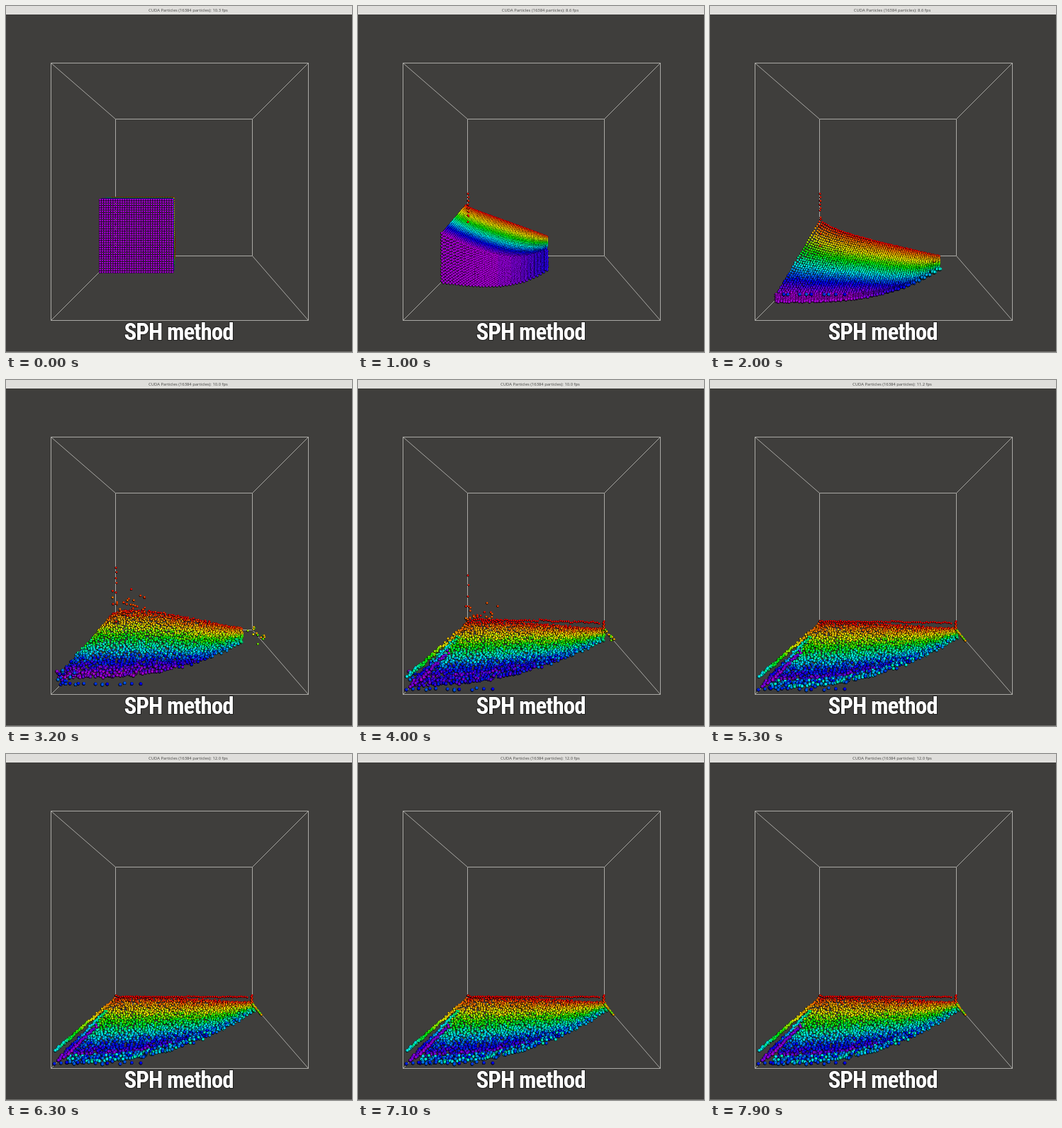
These frames come from a looping animation (488 by 488 pixels, 8000 ms). An HTML page with a canvas:

```html
<!DOCTYPE html>
<html lang="en">
<head>
<meta charset="utf-8">
<title>SPH method</title>
<style>
html, body { margin: 0; width: 100%; height: 100%; overflow: hidden; background: #3f3e3c; }
canvas { display: block; width: 488px; height: 488px; }
</style>
</head>
<body>
<canvas id="stage" width="488" height="488"></canvas>
<script>
const ctx = document.getElementById('stage').getContext('2d');
const LOOP = 8000, STEP = 100;

const clamp = (x, a = 0, b = 1) => Math.min(b, Math.max(a, x));
const mix = (a, b, k) => a + (b - a) * k;
const mixPt = (p, q, k) => [mix(p[0], q[0], k), mix(p[1], q[1], k)];
const ramp = (t, a, b) => clamp((t - a) / (b - a));
const many = (n, make) => Array.from({ length: n }, (_, i) => make(i));

let seed = 7;
function rnd() {
  seed = (seed * 16807) % 2147483647;
  return seed / 2147483647;
}
const spread = () => rnd() + rnd() - 1;

// Rainbow from the back of the block (0) to its front (1)
const HUES = 48;

function rainbow(c) {
  if (c < 1 / 3) return [255, 765 * c, 0];
  if (c < 1 / 2) return [255 * (3 - 6 * c), 255, 0];
  if (c < 2 / 3) return [0, 255, 255 * (6 * c - 3)];
  if (c < 5 / 6) return [0, 255 * (5 - 6 * c), 255];
  return [180 * (6 * c - 5), 0, 255 - 25 * (6 * c - 5)];
}

function makeBall(c) {
  const rgb = rainbow(c);
  const shade = k => `rgb(${rgb.map(v => Math.round(v * k)).join()})`;
  const cv = document.createElement('canvas');
  cv.width = cv.height = 16;
  const g = cv.getContext('2d');
  const fill = g.createRadialGradient(9.8, 5.6, 0.5, 8.8, 7, 9);
  fill.addColorStop(0, shade(1));
  fill.addColorStop(0.35, shade(0.9));
  fill.addColorStop(0.65, shade(0.48));
  fill.addColorStop(0.9, shade(0.03));
  g.fillStyle = fill;
  g.beginPath();
  g.arc(8, 8, 7.7, 0, 7);
  g.fill();
  return cv;
}
const balls = many(HUES + 1, i => makeBall(i / HUES));

function ball(x, y, r, c) {
  ctx.drawImage(balls[Math.round(clamp(c) * HUES)], x - r, y - r, 2 * r, 2 * r);
}
const sizeAt = y => 1.8 + clamp((y - 340) / 100) * 1.1;

// Outline of the fluid: corner points, hump of the back edge, bend of the front edge
const POSES = [
  { t: 0, backL: [150, 271], backR: [236, 271], hump: 0, frontL: [132.5, 375.5], frontR: [234.5, 375.5], bend: 1 },
  { t: 2000, backL: [156, 301], backR: [323, 353], hump: 8, frontL: [95, 417], frontR: [322, 371], bend: 3.2 },
  { t: 3200, backL: [144, 339], backR: [332, 351], hump: -16, frontL: [74, 419], frontR: [331, 370], bend: 2.9 },
  { t: 4000, backL: [150, 346], backR: [346, 352], hump: -6, frontL: [77, 430], frontR: [345, 367], bend: 2.2 },
  { t: 7900, backL: [154, 346], backR: [348, 351], hump: -3, frontL: [88, 436], frontR: [350, 361], bend: 2.4 }
];

const fall = t => Math.pow(clamp(t / 2000), 1.5);

function backPt(pose, u) {
  const [x, y] = mixPt(pose.backL, pose.backR, u);
  return [x, y + pose.hump * Math.sin(Math.PI * Math.sqrt(u))];
}
function frontPt(pose, u) {
  const { frontL: l, frontR: r } = pose;
  return [mix(l[0], r[0], u), mix(l[1], r[1], Math.pow(u, pose.bend))];
}

function edge(curve, t, u) {
  let i = 0;
  while (i < POSES.length - 2 && t >= POSES[i + 1].t) i++;
  const a = POSES[i], b = POSES[i + 1];
  const p = curve(a, u), q = curve(b, u);
  if (i) return mixPt(p, q, Math.sqrt(ramp(t, a.t, b.t)));
  const e = fall(t);
  return [mix(p[0], q[0], e), mix(p[1], q[1], 1 - Math.pow(1 - e, 1 + 1.5 * u))];
}

const COLS = 66, ROWS = 34, SIDE = 32;
const mesh = many(COLS * ROWS, i => ({
  col: i % COLS, s: Math.floor(i / COLS) / (ROWS - 1),
  dx: spread(), dy: spread(), tint: rnd()
}));
const cover = many(SIDE * SIDE, i => ({
  col: i % SIDE, row: Math.floor(i / SIDE), dx: spread(), dy: spread()
}));
const spray = many(46, () => ({
  x: 152 + 46 * Math.pow(rnd(), 1.3), h: 6 + 42 * rnd() * rnd(),
  start: 2250 + 550 * rnd(), life: 1300 + 500 * rnd(), c: 0.16 * rnd()
}));
const tail = many(13, i => ({ k: i / 12, dx: spread(), dy: spread(), c: 0.22 + 0.25 * rnd() }));
const tip = many(18, () => {
  const x = 67 + 34 * rnd();
  return { x, y: 408 + 30 * rnd() * (1 - (x - 67) / 50), c: 0.72 + 0.26 * rnd() };
});
const rim = many(64, i => ({ u: i / 63, dy: spread() }));
const beads = many(14, i => ({ x: 68 + 10 * i * (0.7 + 0.3 * rnd()), y: 436 + 3 * spread(), c: 0.76 + 0.09 * rnd() }));

function strand(n, from, to, c0, c1) {
  return many(n, i => {
    const k = i / (n - 1);
    return { p: mixPt(from, to, k), dx: spread(), dy: spread(), c: mix(c0, c1, k) + 0.06 * spread(), order: rnd() };
  });
}
const strands = [
  ...strand(85, [153, 346], [70, 418], 0.12, 0.68),
  ...strand(60, [142, 362], [74, 431], 0.55, 0.96),
  ...strand(34, [128, 383], [82, 428], 0.95, 0.97)
];

function drawFluid(t) {
  const e = fall(t), late = ramp(t, 3300, 5000);
  const loose = 0.9 * ramp(t, 300, 2000) + 1.7 * ramp(t, 2000, 3200);
  const hueAt = u => 1 - 0.36 * e * Math.pow(clamp((u - 0.42) / 0.58), 1.6);
  const lip = u => 102 * Math.pow(1 - e, 1 + 2 * u) + 10 * e * (1 - u) * (1 - ramp(t, 2000, 3200));

  const cols = many(COLS, i => {
    const u = i / (COLS - 1), b = edge(frontPt, t, u);
    return { u, a: edge(backPt, t, u), b: [b[0], b[1] - lip(u)], hue: hueAt(u) };
  });
  for (const m of mesh) {
    const { u, a, b, hue } = cols[m.col];
    const p = mixPt(a, b, m.s);
    const rough = loose * (0.6 + 0.6 * m.s);
    const y = p[1] + m.dy * rough;
    let c = hue * Math.pow(m.s, 0.76) + 0.05 * (m.tint - 0.5) * loose;
    if (m.s > 0.9) c = mix(c, Math.min(c, 0.62 + 0.22 * m.tint), late);
    ball(p[0] + m.dx * rough, y, sizeAt(y), c);
  }

  if (t < 700) drawFlank(t, lip(1));
  if (t < 3200) drawCover(t, e, loose, lip, hueAt);
}

// Front face of the block, sinking as the fluid spreads
function drawCover(t, e, loose, lip, hueAt) {
  const base = many(SIDE, i => {
    const u = i / (SIDE - 1);
    return { p: edge(frontPt, t, u), h: lip(u), hue: hueAt(u) };
  });
  for (const f of cover) {
    const { p, h, hue } = base[f.col];
    const x = p[0] + (f.row % 2 ? 1.6 : -1.6) * Math.min(1, 2 * e);
    const y = p[1] - h * (1 - f.row / (SIDE - 1));
    ball(x + 1.5 * f.dx * loose, y + f.dy * loose, mix(1.85, 2.5, e), hue);
  }
}

// Right flank of the block, a thin rainbow strip
function drawFlank(t, h) {
  const top = edge(backPt, t, 1), low = edge(frontPt, t, 1);
  const foot = [top[0] + 1, low[1] - 23];
  for (let v = 0; v <= 12; v++) {
    const a = mixPt(top, [low[0], low[1] - h], v / 12), b = mixPt(foot, low, v / 12);
    for (let w = 0; w < 30; w++) {
      const p = mixPt(a, b, w / 29);
      ball(p[0] + 0.6, p[1], 1.5, v / 12);
    }
  }
}

// Beads sliding down the far left corner
function drawCorner(t) {
  for (let i = 0; i < 11; i++) {
    const s = Math.max(0, t - 3200 + i * 270) / 1000;
    const y = Math.min(341, 265 + i * 3.4 + (i % 3) * 1.5 + 17 * s * s);
    ball(155 + (i % 2) * 0.9, y, 1.7, 0.03 + 0.01 * (i % 4));
  }
}

function drawSpray(t) {
  for (const s of spray) {
    const q = (t - s.start) / s.life;
    if (q > 0 && q < 1) ball(s.x - 4 + 4 * q, 339 - s.h * 4 * q * (1 - q), 1.9, s.c);
  }
}

function drawStray(t) {
  const go = ramp(t, 2000, 3200), wild = Math.sin(Math.PI * ramp(t, 2000, 4200));
  for (const b of tail) {
    const end = mixPt([347, 352], [360, 368], b.k);
    ball(mix(316, end[0], go) + b.dx * 12 * wild, mix(360, end[1], go) + b.dy * 12 * wild, 1.9, b.c);
  }
  const slide = ramp(t, 2000, 3600);
  for (const b of beads) ball(mix(Math.max(b.x, 104), b.x, slide), mix(407, b.y, slide), 2.7, b.c);
  const out = ramp(t, 2300, 3100);
  if (out > 0 && t < 4200) {
    for (const b of tip) ball(mix(100, b.x, out), mix(408, b.y, out), 2.7, b.c);
  }
}

// Strands along the left wall and the thin red line at the back
function drawRest(t) {
  const show = ramp(t, 3200, 3900), flat = ramp(t, 3200, 6300);
  const width = mix(3.4, 1.8, flat);
  for (const b of strands) {
    const y = b.p[1] + b.dy * width;
    if (b.order < show) ball(b.p[0] + b.dx * width, y, sizeAt(y), b.c);
  }
  for (const b of rim) {
    if (b.u > show) continue;
    const y = mix(337 + 5 * b.u * b.u, 342.5, flat) + b.dy * mix(2.4, 0.9, flat);
    ball(158 + b.u * 182, y, 1.7, 0);
  }
  for (let i = 0; i < 6 * show; i++) ball(347 - (i % 2), 340.5 + i * 2.2, 1.8, 0.02 * i);
}

function line(x0, y0, x1, y1, color = '#a9a8a4') {
  ctx.strokeStyle = color;
  ctx.lineWidth = 1;
  ctx.beginPath();
  ctx.moveTo(x0, y0);
  ctx.lineTo(x1, y1);
  ctx.stroke();
}

function drawBox() {
  const near = [63.5, 80.5, 426.5, 443.5], far = [154.5, 159.5, 347.5, 352.5];
  for (const [l, t, r, b] of [near, far]) {
    line(l, t, r, t);
    line(r, t, r, b);
    line(r, b, l, b);
    line(l, b, l, t);
  }
  for (const i of [0, 2]) for (const j of [1, 3]) line(near[i], near[j], far[i], far[j]);
}

// The frame rate dips during the collapse, then recovers
const RATES = [[0, 10.3], [900, 8.6], [2800, 10], [4600, 11.2], [5800, 12]];

function drawBar(t) {
  ctx.fillStyle = '#dfdedb';
  ctx.fillRect(0, 0, 488, 12);
  const rate = RATES.filter(r => r[0] <= t).pop()[1].toFixed(1);
  ctx.font = '5.85px "Noto Sans", "Open Sans", sans-serif';
  ctx.textAlign = 'center';
  ctx.fillStyle = '#4c4c4a';
  ctx.fillText(`CUDA Particles (16384 particles): ${rate} fps`, 257, 7.6);
}

function drawCaption() {
  const text = 'SPH method';
  const setFont = size => {
    ctx.font = `900 ${size}px Impact, "Roboto Condensed", "Liberation Sans Narrow", Roboto, sans-serif`;
    ctx.letterSpacing = `${-0.03 * size}px`;
  };
  ctx.save();
  ctx.fontStretch = 'condensed';
  setFont(100);
  const size = 15400 / ctx.measureText(text).width;
  setFont(size);
  ctx.textAlign = 'center';
  ctx.lineJoin = 'round';
  ctx.lineWidth = 2;
  ctx.strokeStyle = '#1c1c1b';
  const y = 459 + size * 0.357;
  ctx.strokeText(text, 243.5, y);
  ctx.fillStyle = '#fff';
  ctx.fillText(text, 243.5, y);
  ctx.restore();
}

function draw(t) {
  ctx.fillStyle = '#3f3e3c';
  ctx.fillRect(0, 0, 488, 488);
  drawBox();
  drawFluid(t);
  if (t > 900) drawCorner(t);
  drawSpray(t);
  if (t > 1900) drawStray(t);
  if (t > 3200) drawRest(t);
  drawBar(t);
  drawCaption();
  line(0, 487.5, 488, 487.5, '#6f6e6b');
}

let last = -1;
const began = performance.now();
function tick() {
  const t = Math.floor(((performance.now() - began) % LOOP) / STEP) * STEP;
  if (t !== last) draw(last = t);
  requestAnimationFrame(tick);
}
tick();
</script>
</body>
</html>
```
